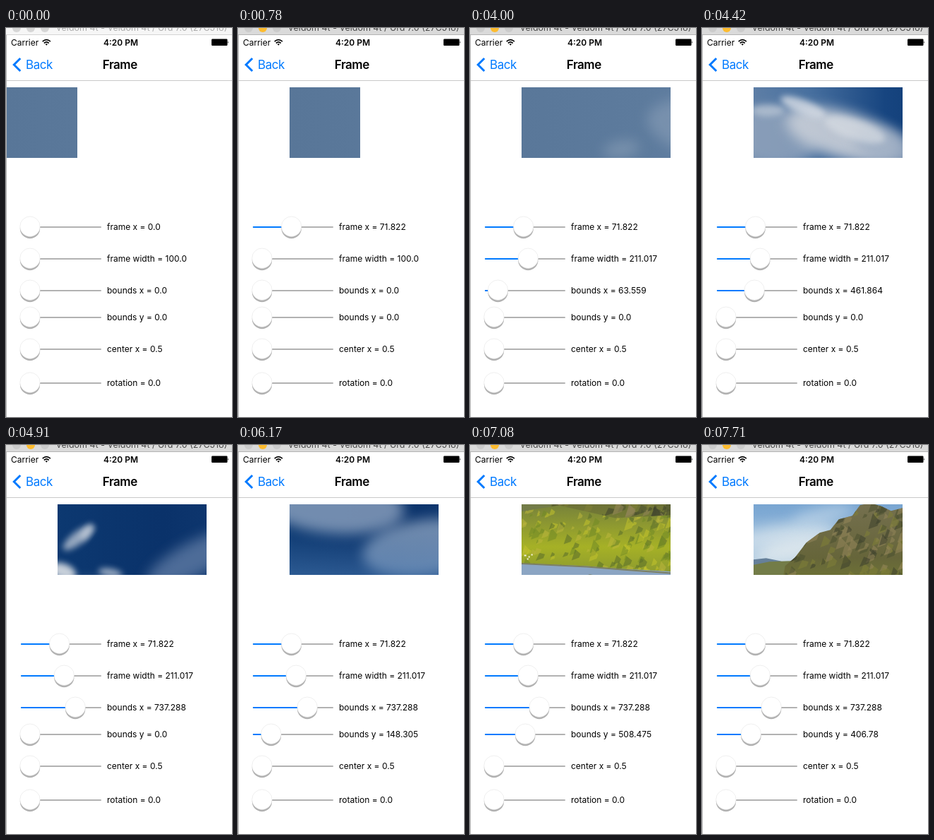
Write an HTML page that moves like this. It is 320 by 551 pixels and loops after 8000 ms.

```html
<!DOCTYPE html>
<html lang="en">
<head>
<meta charset="utf-8">
<title>Frame</title>
<style>
  html, body { margin: 0; width: 100%; height: 100%; overflow: hidden; background: #fff; }
  svg { display: block; }
  text { font-family: Inter, Roboto, "Liberation Sans", sans-serif; font-size: 12px; }
  .nav { font-size: 17px; letter-spacing: -.45px; }
</style>
</head>
<body>
<svg id="stage" width="320" height="551" viewBox="0 0 320 551">
  <defs>
    <filter id="soft" x="-60%" y="-60%" width="220%" height="220%"><feGaussianBlur stdDeviation="9"/></filter>
    <filter id="wisp" x="-60%" y="-60%" width="220%" height="220%"><feGaussianBlur stdDeviation="4"/></filter>
    <filter id="shadow" x="-30%" y="-30%" width="160%" height="160%"><feGaussianBlur stdDeviation=".7"/></filter>
    <linearGradient id="sky">
      <stop offset="0" stop-color="#587698"/>
      <stop offset=".2" stop-color="#5d7b9d"/>
      <stop offset=".36" stop-color="#6583a8"/>
      <stop offset=".45" stop-color="#48709f"/>
      <stop offset=".54" stop-color="#174580"/>
      <stop offset=".62" stop-color="#0c3870"/>
      <stop offset=".74" stop-color="#0a326a"/>
      <stop offset="1" stop-color="#1b447c"/>
    </linearGradient>
    <linearGradient id="lowSky" x2="0" y2="1">
      <stop offset="0" stop-color="#4a78b0" stop-opacity="0"/>
      <stop offset=".45" stop-color="#5488c0"/>
      <stop offset=".75" stop-color="#7faad4"/>
      <stop offset="1" stop-color="#c4d8e6"/>
    </linearGradient>
    <linearGradient id="rock" x2="0" y2="1">
      <stop offset="0" stop-color="#75704f"/>
      <stop offset=".5" stop-color="#66653a"/>
      <stop offset="1" stop-color="#7c8a30"/>
    </linearGradient>
    <linearGradient id="grass" x2="0" y2="1">
      <stop offset="0" stop-color="#78833a"/>
      <stop offset=".6" stop-color="#a6b126"/>
      <stop offset="1" stop-color="#8b992f"/>
    </linearGradient>
    <clipPath id="window"><rect id="windowRect" y="84" height="100"/></clipPath>
    <clipPath id="ridge"><path id="ridgePath" d="M782 494 796 482 812 461 831 447 846 443 858 428 877 423 888 408 902 405 917 409 932 416 948 412 990 425V560H770Z"/></clipPath>
    <clipPath id="meadow"><path id="meadowPath" d="M730 520 790 510 870 528 990 522V608L940 603 880 600 830 596 737 592H730Z"/></clipPath>
  </defs>

  <rect width="320" height="551" fill="#fff"/>
  <rect id="bar" width="320" height="9"/>
  <g id="lights"></g>
  <text id="title" x="192" y="4" text-anchor="middle" style="font-size:12.5px">Veldom 4t - Veldom 4t / Urd 7.0 (27C518)</text>
  <rect id="barEdge" y="9" width="320" height="1"/>
  <rect y="10" width="1" height="541" fill="#b4b4b4"/>

  <text x="7" y="24.5">Carrier</text>
  <g fill="none" stroke="#000" stroke-width="1.7">
    <path d="M51.7 19.2Q57.3 14 62.9 19.2M53.9 21.5Q57.3 18.4 60.7 21.5"/>
    <path d="M55.6 22.8 57.3 24.8 59 22.8Q57.3 21.6 55.6 22.8Z" fill="#000" stroke="none"/>
  </g>
  <text x="162.5" y="24.5" text-anchor="middle" font-weight="600">4:20 PM</text>
  <rect x="291" y="15.5" width="22.5" height="9.5" rx="1.2"/>
  <path d="M314.3 18.5q1.7 1.8 0 3.6z"/>

  <path d="M20.3 43 11.3 52 20.3 61" fill="none" stroke="#007aff" stroke-width="3"/>
  <text class="nav" x="28" y="58" fill="#007aff">Back</text>
  <text class="nav" x="161.3" y="58" text-anchor="middle" font-weight="600">Frame</text>
  <rect x="1" y="74" width="319" height="1" fill="#c8c8c8"/>

  <g clip-path="url(#window)"><g id="photo">
    <rect width="1200" height="420" fill="url(#sky)"/>
    <g id="clouds"></g>
    <rect y="180" width="1200" height="320" fill="url(#lowSky)"/>
    <g id="lowClouds"></g>
    <path d="M730 486 755 483 775 487 800 496V530H730Z" fill="#66809a"/>
    <path d="M730 494 760 488 790 487 830 508V545H730Z" fill="#737c48"/>
    <use href="#ridgePath" fill="url(#rock)"/>
    <g id="rocks" clip-path="url(#ridge)"></g>
    <rect x="730" y="585" width="270" height="150" fill="#8ba5c3"/>
    <use href="#meadowPath" fill="url(#grass)"/>
    <g id="plants" clip-path="url(#meadow)"></g>
    <path d="M730 592 830 597 880 601 990 609" fill="none" stroke="#7c7f62" stroke-width="2"/>
    <path d="M741 581h3m3 2h2m2-3h2m-8 6h2" stroke="#f4f4e4" stroke-width="2"/>
    <path d="M775 623 782 614 798 609 816 611 834 608 852 610 872 614 888 620 910 624 950 627V632L870 629 830 630 795 628Z" fill="#58602f"/>
    <path d="M790 615 812 613 830 616 858 613 866 619 820 622Z" fill="#7b7d3a"/>
    <path d="M778 627 830 631 880 631 950 634" fill="none" stroke="#4a5260" stroke-width="1.5"/>
  </g></g>

  <g id="sliders"></g>
</svg>
<script>
const $ = id => document.getElementById(id);
const LOOP = 8000, TICK = 70, ACTIVE_AT = 500, STOPS = 236;

function add(parent, tag, attrs) {
  const node = document.createElementNS("http://www.w3.org/2000/svg", tag);
  return parent.appendChild(set(node, attrs));
}
function set(node, attrs) {
  for (const key in attrs) node.setAttribute(key, attrs[key]);
  return node;
}

// Soft ellipses: x, y, rx, ry, angle, colour, opacity
function puffs(parent, filter, list) {
  for (const [x, y, rx, ry, angle, fill, opacity] of list)
    add(parent, "ellipse", { rx, ry, fill, opacity, filter: `url(#${filter})`,
      transform: `translate(${x} ${y}) rotate(${angle})` });
}
puffs($("clouds"), "soft", [
  [205, 88, 26, 12, -10, "#8ba0b8", .6],
  [340, 60, 100, 42, 10, "#91a4bc", .5],
  [490, 70, 65, 42, 5, "#93a5bd", .8],
  [590, 68, 85, 33, 16, "#c3cad5", .95],
  [650, 84, 50, 24, 20, "#9fafc4", .85],
  [930, 78, 75, 24, -28, "#647fa7", .75],
  [800, 150, 100, 40, 5, "#9eb1cb", .7],
  [930, 210, 90, 40, -8, "#b0c2d8", .6]
]);
puffs($("clouds"), "wisp", [
  [482, 33, 24, 8, 0, "#bfcad8", .7],
  [532, 28, 34, 10, 22, "#d5dbe4", .8],
  [605, 60, 45, 14, 18, "#d6dbe2", .7],
  [767, 47, 27, 9, -38, "#b7c3d3", .8],
  [779, 40, 13, 5, -55, "#dce1e7", .6],
  [745, 95, 19, 11, 20, "#dbe0e5", .9],
  [812, 97, 17, 6, 10, "#b9c5d4", .8]
]);
puffs($("lowClouds"), "soft", [
  [780, 452, 75, 16, -8, "#cfdfeb", .85],
  [795, 470, 55, 16, -12, "#e0e9ee", .85],
  [835, 422, 45, 10, -12, "#c3d8e9", .7]
]);

function scatter(parent, count, [x, y, w, h], size, colors) {
  let seed = 7;
  const rnd = () => (seed = seed * 16807 % 2147483647) / 2147483647;
  for (let i = 0; i < count; i++) {
    const px = x + rnd() * w, py = y + rnd() * h, s = size * (.4 + rnd());
    add(parent, "path", { fill: colors[i % colors.length], opacity: .55,
      d: `M${px} ${py}l${s} ${s * (.2 + rnd())} ${-s * .3} ${s * .7} ${-s * 1.4} ${s * .5}z` });
  }
}
scatter($("rocks"), 200, [780, 400, 200, 125], 7, ["#3d412d", "#94865a", "#4c5131", "#808038"]);
scatter($("plants"), 180, [730, 512, 250, 95], 6, ["#c3c42c", "#728a26", "#bcb73c", "#596e2b"]);

const lights = [15, 35, 55].map(cx => add($("lights"), "circle", { cx, cy: 0, r: 6 }));

const rows = [
  ["frame x", 282], ["frame width", 327], ["bounds x", 372],
  ["bounds y", 410], ["center x", 455], ["rotation", 503]
].map(([name, y]) => {
  const g = add($("sliders"), "g", { transform: `translate(0 ${y})` });
  add(g, "rect", { x: 21, y: -1, width: 114, height: 2, rx: 1, fill: "#b2b2b2" });
  const fill = add(g, "rect", { x: 21, y: -1, height: 2, rx: 1, fill: "#007aff" });
  const thumb = add(g, "g", {});
  add(thumb, "circle", { cy: 2, r: 14.2, fill: "#000", opacity: .3, filter: "url(#shadow)" });
  add(thumb, "circle", { cy: -.8, r: 14.2, fill: "#fff", stroke: "#dedede", "stroke-width": .5 });
  const label = add(g, "text", { x: 143, y: 4 });
  return { name, fill, thumb, label };
});

function format(value) {
  const text = String(+value.toFixed(3));
  return text.includes(".") ? text : text + ".0";
}

function showRow(row, part, value) {
  const x = 34 + 87 * part;
  set(row.fill, { width: x - 21 });
  set(row.thumb, { transform: `translate(${x} 0)` });
  row.label.textContent = `${row.name} = ${format(value)}`;
}

// Progress of a hand drag in `steps` moves, the first at `start`:
// gentle at both ends, fastest a little before the middle
function drag(now, start, steps) {
  const p = Math.min(1, Math.max(0, ((now - start) / TICK + 1) / steps)) ** .852;
  return p * p * (3 - 2 * p);
}

function scrollY(now) {
  if (now >= 7710) return 96;
  return 138 * drag(now, 6030, 11) - 41 * drag(now, 7010, 5);
}

function render(now) {
  const snap = stops => Math.round(stops) / STOPS;
  const parts = [
    snap(113 * drag(now, 500, 5)),
    snap(131 * drag(now, 2110, 9)),
    snap(174 * drag(now, 3930, 15)),
    snap(scrollY(now)), 0, 0
  ];
  const [x, width, left, top] = [150 * parts[0], 100 + 200 * parts[1], 1000 * parts[2], 1000 * parts[3]];
  [x, width, left, top, .5, 0].forEach((value, i) => showRow(rows[i], parts[i], value));

  const edge = Math.round(1 + x);
  set($("windowRect"), { x: edge, width: Math.round(width) });
  set($("photo"), { transform: `translate(${edge - left} ${84 - top})` });

  const active = now >= ACTIVE_AT;
  set($("bar"), { fill: active ? "#dadada" : "#f6f6f6" });
  set($("barEdge"), { fill: active ? "#b4b4b4" : "#d4d4d4" });
  set($("title"), { fill: active ? "#4a4a4a" : "#ababab" });
  lights.forEach((light, i) => set(light, { fill: !active ? "#d6d6d6" : i === 1 ? "#fdbc2f" : "#cbcbcb" }));
}

let shown = -1;
function frame(clock) {
  const t = clock % LOOP;
  const now = t < ACTIVE_AT ? 0 : ACTIVE_AT + Math.floor((t - ACTIVE_AT) / TICK) * TICK;
  if (now !== shown) render(shown = now);
  requestAnimationFrame(frame);
}
render(0);
requestAnimationFrame(frame);
</script>
</body>
</html>
```
